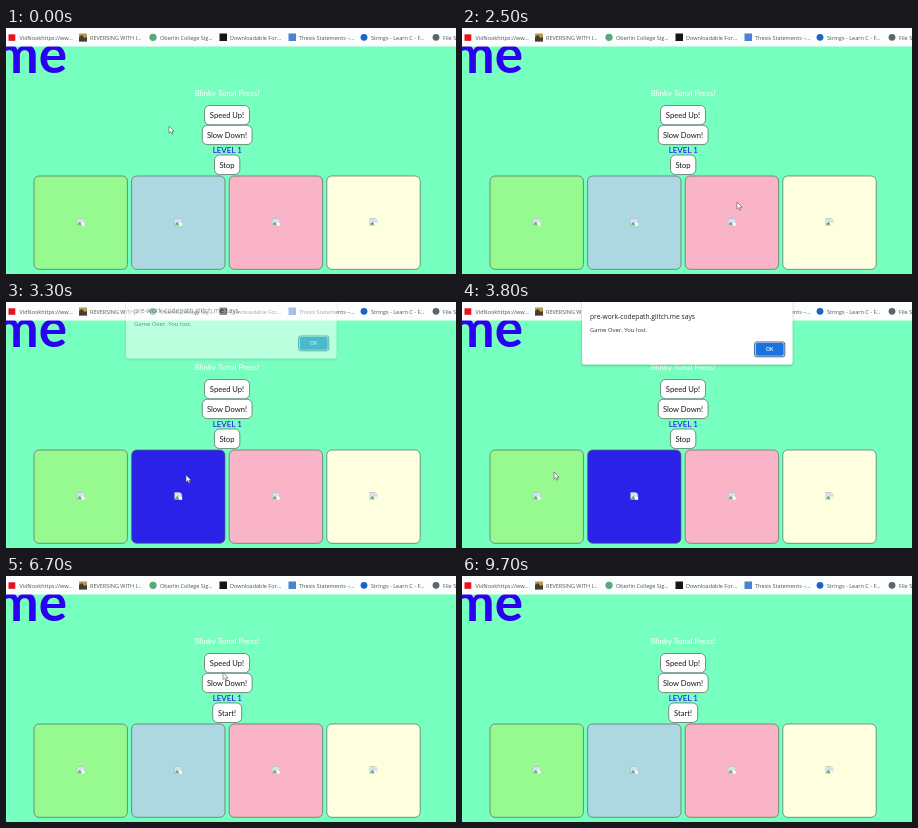
These frames come from a looping animation (450 by 246 pixels, 9.8 s). An HTML page:

```html
<!DOCTYPE html>
<html lang="en">
<head>
<meta charset="utf-8">
<title>Memory game</title>
<style>
  html, body { margin: 0; width: 100%; height: 100%; overflow: hidden; background: #76ffbe; }
  svg { display: block; width: 100%; height: 100%; }

  .bar { font: 5.5px "Open Sans", sans-serif; fill: #505050; }
  .big { font: 700 53px Lato, sans-serif; fill: #2a00f0; text-anchor: end; }
  .mid { font: 7.6px Lato, sans-serif; text-anchor: middle; fill: #181818; }
  .mid .name { font-size: 8px; fill: #fff; }
  .mid .level { font-size: 8px; fill: #2a00f0; }
  .btn { fill: #fff; stroke: #555f5a; stroke-width: .7; }
  .card { stroke: #4f6a5d; stroke-width: .7; }
  .says { font: 6.7px "Open Sans", sans-serif; fill: #202124; }
  .msg { font: 5.9px "Open Sans", sans-serif; fill: #303236; }
  .ok { font: 600 5.2px "Open Sans", sans-serif; fill: #fff; text-anchor: middle; }

  .pink, .blue, .stop, .start, .alert { animation: 9.8s step-end infinite; }
  .pink { animation-name: pink; }
  .blue { animation-name: blue; }
  .stop { animation-name: stop; }
  .start { animation-name: start; }
  .alert { animation-name: alert; }
  .cursor { animation: move 9.8s infinite, leave 9.8s step-end infinite; }

  @keyframes pink {
    0%, 30.61% { fill: #fab4c8; }
    26.53% { fill: #f48098; }
  }
  @keyframes blue {
    0%, 58.16% { fill: #add8e2; }
    31.63% { fill: #2a22e8; }
    57.14% { fill: #687cf0; }
  }
  @keyframes stop {
    0% { opacity: 1; }
    57.14% { opacity: 0; }
  }
  @keyframes start {
    0% { opacity: 0; }
    57.14% { opacity: 1; }
  }
  @keyframes alert {
    0%, 58.16% { opacity: 0; transform: translateY(-6px); }
    33.67% { opacity: .5; transform: translateY(-6px); }
    34.69% { opacity: 1; transform: none; }
    57.14% { opacity: .65; transform: translateY(-6px); }
  }
  /* the pointer is redrawn ten times a second */
  @keyframes move {
    0% { transform: translate(163px, 98px); }
    15.3% { transform: translate(163px, 98px); animation-timing-function: steps(9); }
    24.48% { transform: translate(275px, 174px); }
    27.55% { transform: translate(275px, 174px); animation-timing-function: steps(2); }
    29.59% { transform: translate(180px, 173px); }
    33.67% { transform: translate(180px, 173px); animation-timing-function: steps(5); }
    38.77% { transform: translate(92px, 170px); }
    42.85% { transform: translate(92px, 170px); animation-timing-function: steps(11); }
    54.08% { transform: translate(313px, 47px); }
    57.14% { transform: translate(313px, 47px); animation-timing-function: steps(10); }
    67.34%, 100% { transform: translate(217px, 96.5px); }
  }
  @keyframes leave {
    0% { opacity: 1; }
    75.5% { opacity: 0; }
  }
</style>
</head>
<body>
<svg viewBox="0 0 450 246" preserveAspectRatio="none">
  <defs>
    <g id="broken">
      <path d="M-3.5-3.5H1.8L3.5-1.8V3.3H-3.5Z" fill="#fff" stroke="#a4a9ad" stroke-width=".6"/>
      <path d="M-2.9-2.9H1.4L2.9-1.4V.8H-2.9Z" fill="#d3e0f6"/>
      <path d="M-2.9 2.8V1.8L-.8 0 1.2 2.8Z" fill="#5aa552"/>
      <path d="M.4 3.7 3.9.3V3.7Z" fill="#fff"/>
    </g>
    <filter id="shadow" x="-5%" y="-10%" width="110%" height="130%">
      <feDropShadow dx="0" dy="1" stdDeviation="1.2" flood-opacity=".3"/>
    </filter>
  </defs>

  <rect width="450" height="246" fill="#76ffbe"/>
  <text class="big" x="61" y="45">me</text>

  <g class="bar">
    <rect width="450" height="18.5" fill="#fcfdfe"/>
    <rect x="2.5" y="6.3" width="6.8" height="6.5" fill="#e8121c"/>
    <text x="13.5" y="11.7">VidNookhttps://ww...</text>
    <rect x="73" y="5.5" width="8" height="8" fill="#b99a55"/>
    <path d="M73 13.5V9L76 7 78.5 10 81 9V13.5Z" fill="#4b3d2c"/>
    <text x="84" y="11.7">REVERSING WITH I...</text>
    <circle cx="147" cy="9.3" r="3.6" fill="#58a878"/>
    <text x="154" y="11.7">Oberlin College Sig...</text>
    <rect x="213.5" y="5.5" width="7.5" height="7.5" fill="#151515"/>
    <text x="224" y="11.7">Downloadable For...</text>
    <rect x="282.5" y="5.5" width="7.5" height="7.5" fill="#4a84cc"/>
    <text x="293" y="11.7">Thesis Statements –...</text>
    <circle cx="358" cy="9.3" r="3.4" fill="#1c63c4"/>
    <text x="365" y="11.7">Strings - Learn C - F...</text>
    <circle cx="430" cy="9.3" r="3.4" fill="#5c6468"/>
    <text x="437" y="11.7">File S</text>
  </g>

  <g class="mid">
    <text class="name" x="221" y="67.5">Blinky Tonal Press!</text>
    <rect class="btn" x="198.5" y="77.5" width="45" height="19.3" rx="5"/>
    <text x="221" y="90">Speed Up!</text>
    <rect class="btn" x="196.3" y="97.3" width="49.8" height="19.3" rx="5"/>
    <text x="221" y="109.8">Slow Down!</text>
    <text class="level" x="221.3" y="125">LEVEL 1</text>
    <g class="stop">
      <rect class="btn" x="208.5" y="127" width="25.3" height="19.5" rx="5"/>
      <text x="221" y="139.6">Stop</text>
    </g>
    <g class="start">
      <rect class="btn" x="206.7" y="127" width="29" height="19.5" rx="5"/>
      <text x="221" y="139.6">Start!</text>
    </g>
  </g>

  <rect class="card" x="28" y="148" width="93.4" height="93.3" rx="5" fill="#96fa91"/>
  <rect class="card blue" x="125.6" y="148" width="93.4" height="93.3" rx="5"/>
  <rect class="card pink" x="223.2" y="148" width="93.4" height="93.3" rx="5"/>
  <rect class="card" x="320.8" y="148" width="93.4" height="93.3" rx="5" fill="#feffdf"/>
  <use href="#broken" x="74.7" y="194"/>
  <use href="#broken" x="172.2" y="194"/>
  <use href="#broken" x="269.8" y="194"/>
  <use href="#broken" x="367.4" y="194"/>

  <g class="alert">
    <path d="M120-10H330.5V60Q330.5 62.5 328 62.5H122.5Q120 62.5 120 60Z" fill="#fff" filter="url(#shadow)"/>
    <text class="says" x="128" y="16.8">pre-work-codepath.glitch.me says</text>
    <text class="msg" x="128" y="30">Game Over. You lost.</text>
    <rect x="292.6" y="40" width="30.2" height="14.8" rx="2" fill="#fff" stroke="#1d4f91" stroke-width=".9"/>
    <rect x="293.7" y="41.1" width="28" height="12.6" rx="1.4" fill="#1a73e0"/>
    <text class="ok" x="307.7" y="49.2">OK</text>
  </g>

  <path class="cursor" d="M0 0V7.2L1.7 5.7 2.8 8.2 4 7.7 2.9 5.2H5.1Z" fill="#fff" stroke="#444" stroke-width=".55"/>
</svg>
</body>
</html>
```
